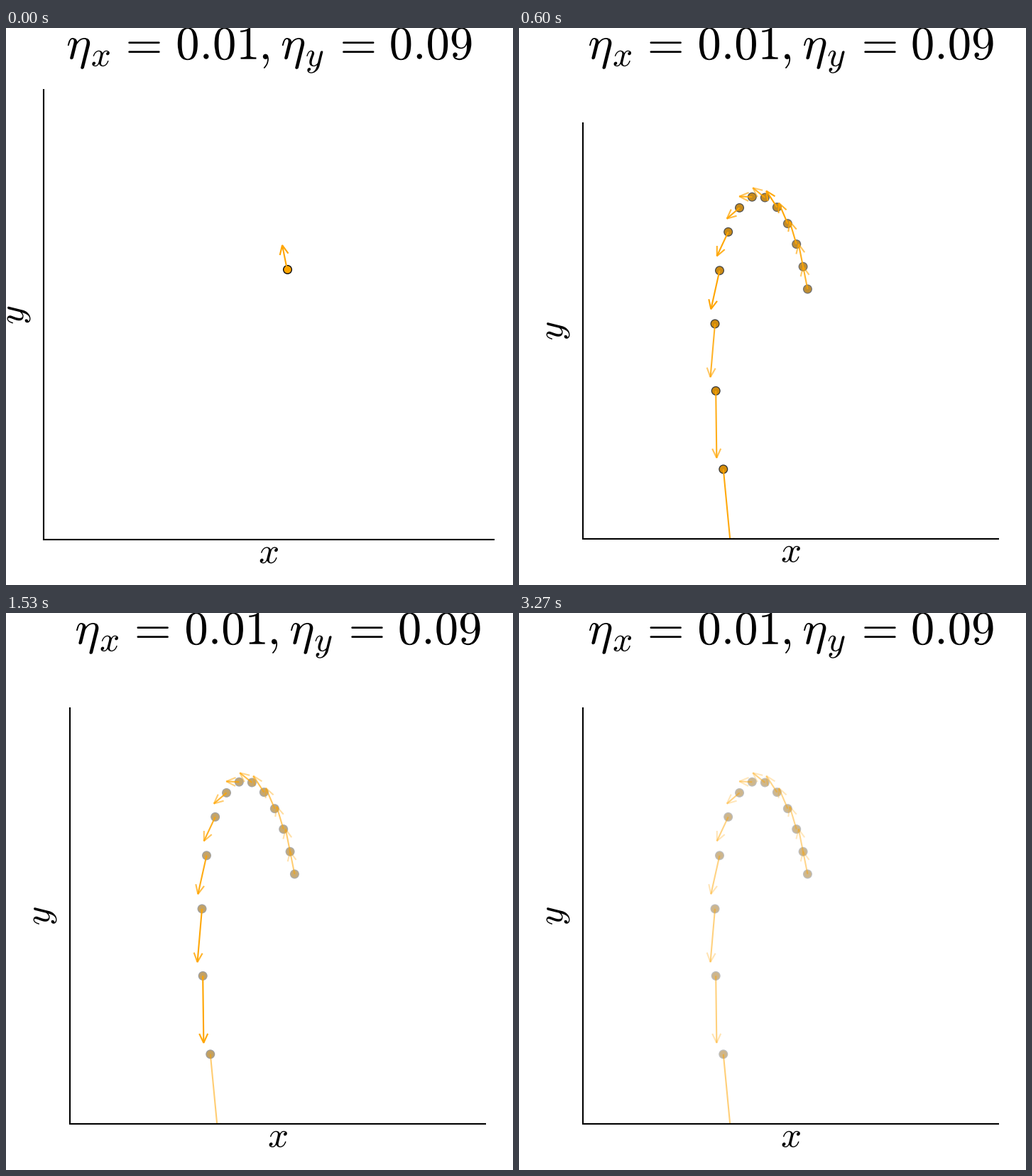
Recreate the animation shown at these times as a matplotlib script. Size 714 by 785 pixels, loop 3.34 s.

```python
import matplotlib.pyplot as plt
import numpy as np
from matplotlib.animation import FuncAnimation
from matplotlib.collections import LineCollection
from matplotlib.patches import PathPatch, Rectangle
from matplotlib.path import Path
from matplotlib.textpath import TextPath
from matplotlib.transforms import Affine2D

W, H, DPI = 714, 785, 64
PT = 72 / DPI                      # points per pixel
TICK, LOOP = 20, 3340              # ms
STEPS = 50
BLACK, ORANGE = (0, 0, 0), (1, 165 / 255, 0)
ETA_X, ETA_Y = 0.01, 0.09
FLOOR, DECAY = 0.25, 0.95
VISIBLE = 13

plt.rcParams["mathtext.fontset"] = "cm"

fig = plt.figure(figsize=(W / DPI, H / DPI), dpi=DPI, facecolor="white")
ax = fig.add_axes([0, 0, 1, 1])
ax.set(xlim=(0, W), ylim=(H, 0), autoscale_on=False)
ax.axis("off")


def descent_ascent(count):
    """Simultaneous descent in x and ascent in y on x^2 + 10xy + y^2."""
    pts = [np.array([0.4, 1.0])]
    while len(pts) < count:
        x, y = pts[-1]
        grad = np.array([2 * x + 10 * y, 10 * x + 2 * y])
        pts.append(pts[-1] + grad * (-ETA_X, ETA_Y))
    return np.array(pts)


def glyphs(text, size, angle=0):
    path = TextPath((0, 0), text, size=size)
    return path.transformed(Affine2D().scale(1, -1).rotate_deg(-angle))


def move(path, dx, dy):
    return path.transformed(Affine2D().translate(dx, dy))


def left_aligned(text, size, left, baseline):
    path = glyphs(text, size)
    return move(path, left - path.get_extents().x0, baseline)


def centred(path, centre):
    box = path.get_extents()
    return move(path, centre[0] - (box.x0 + box.x1) / 2,
                centre[1] - (box.y0 + box.y1) / 2)


# text, size, left edge of the ink, baseline
TITLE = [left_aligned(*part) for part in (
    (r"$\eta$", 66.7, 99, 44), ("$x$", 49.5, 133.5, 54),
    ("$=$", 66.7, 184.5, 44), ("$0.01$", 66.7, 254, 44),
    ("$,$", 66.7, 374, 44),
    (r"$\eta$", 66.7, 401, 44), ("$y$", 49.5, 435.5, 54),
    ("$=$", 66.7, 486.3, 44), ("$0.09$", 66.7, 554.5, 44),
)]
X_LABEL, Y_LABEL = glyphs("$x$", 51), glyphs("$y$", 51, angle=90)

PATH = descent_ascent(VISIBLE)
MOVES = np.diff(PATH, axis=0)
MOVES = np.vstack([MOVES[:1], MOVES])


class Layout:
    """Fixed frame and lettering, with the trajectory in pixels."""

    def __init__(self, left, bottom, side, title_dx, x_at, y_at):
        right, top = left + side, bottom - side
        self.box = (left, top), side, side
        frame, = ax.plot([left, left, right], [top, bottom, bottom],
                         color=BLACK, lw=2.1 * PT, zorder=4,
                         solid_capstyle="butt", solid_joinstyle="miter")
        texts = [move(p, title_dx, 0) for p in TITLE]
        texts += [centred(X_LABEL, x_at), centred(Y_LABEL, y_at)]
        text = PathPatch(Path.make_compound_path(*texts), fc=BLACK, lw=0)
        ax.add_patch(text)
        self.artists = frame, text

        scale = np.array([side, -side]) / 10
        self.points = (PATH + 5) * scale + (left, bottom)
        tips = self.points + MOVES * scale
        self.shafts = np.stack([self.points, tips], axis=1)
        back = self.points - tips
        back /= np.hypot(*back.T)[:, None]
        side_way = back[:, ::-1] * (-1, 1)
        self.heads = np.stack([tips + 13 * back + 6 * side_way, tips,
                               tips + 13 * back - 6 * side_way], axis=1)

    def show(self, on):
        for artist in self.artists:
            artist.set_visible(on)


opening = Layout(53, 721.4, 635, -12.2, (370.3, 743), (18, 404.5))
settled = Layout(89.6, 720, 586.7, 0, (383.2, 741.5), (55, 427))


def discs(radius):
    dots = ax.scatter([], [], s=(2 * radius * PT) ** 2, lw=0, zorder=2)
    return dots


def strokes():
    lines = LineCollection([], lw=2.1 * PT, zorder=3, capstyle="butt",
                           joinstyle="miter")
    ax.add_collection(lines, autolim=False)
    lines.set_clip_path(Rectangle(*settled.box, transform=ax.transData))
    return lines


rims, fills = discs(6.5), discs(5.2)
shafts, heads = strokes(), strokes()


def fade(age):
    return FLOOR + (1 - FLOOR) * DECAY ** age


def tint(color, alpha):
    return [(*color, a) for a in alpha]


def update(tick):
    step = min(STEPS - 1, (tick * TICK + 14) * 3 // 200)
    count = 2 * step + 1
    lay = settled if step else opening
    opening.show(step == 0)
    settled.show(step > 0)

    j = np.arange(min(count, VISIBLE))
    dot_alpha = fade(count - 1 - j)
    for dots, color in ((rims, BLACK), (fills, ORANGE)):
        dots.set_offsets(lay.points[j])
        dots.set_facecolor(tint(color, dot_alpha))

    # arrow opacities cycle through the list four entries at a time,
    # and a shaft counts as two strokes
    head_alpha = fade(count - 1 - (4 * j + 1) % count)
    shafts.set_segments(lay.shafts[j])
    shafts.set_color(tint(ORANGE, 1 - (1 - head_alpha) ** 2))
    heads.set_segments(lay.heads[j])
    heads.set_color(tint(ORANGE, head_alpha))
    return []


anim = FuncAnimation(fig, update, frames=LOOP // TICK, interval=TICK,
                     repeat=True, repeat_delay=0, init_func=lambda: [],
                     blit=False)
plt.show()
```
